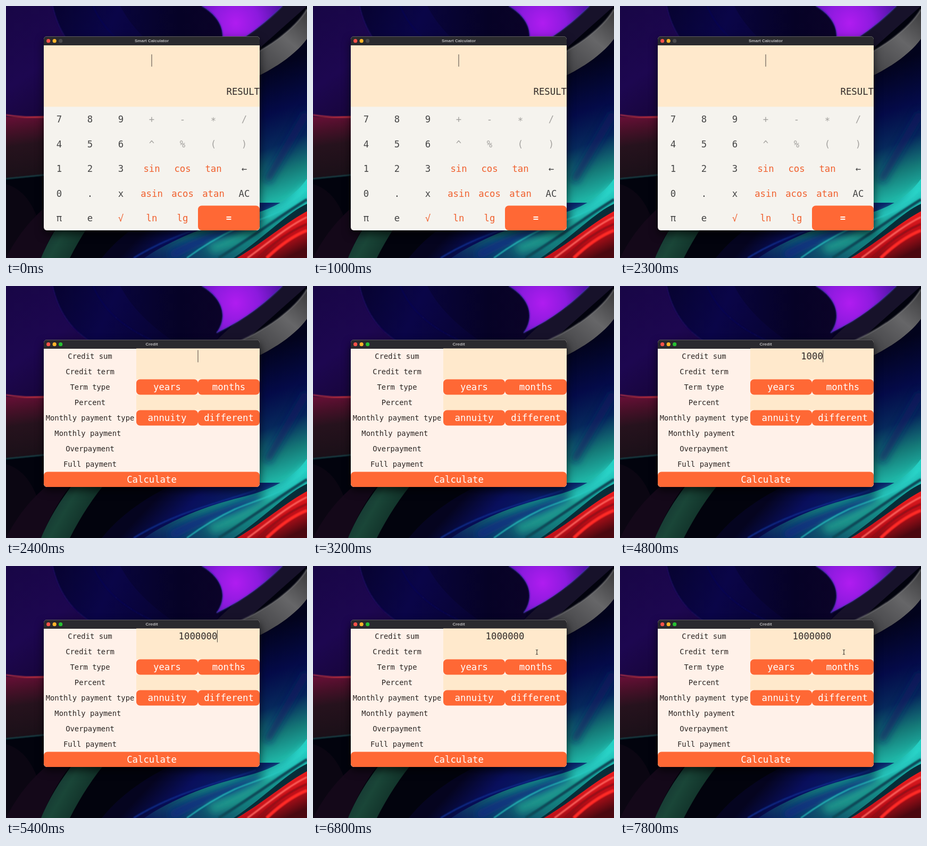
An HTML page for the animation above (8 s loop, 566 px wide and 474 px high).

```html
<!DOCTYPE html>
<html lang="en">
<head>
<meta charset="utf-8">
<title>Calculator</title>
<style>
html, body { margin: 0; width: 566px; height: 474px; overflow: hidden; background: #02030d }
svg { display: block }
text { font: 17.3px "DejaVu Sans Mono", monospace; text-anchor: middle }
.label { font-size: 13.85px; fill: #2b2523 }
.title { font: bold 8px "Liberation Sans", sans-serif; fill: #b9b9bb }
.num { fill: #444 }
.op { fill: #a3a19e }
.fn { fill: #f0612f }
.btn { fill: #fff }
</style>
</head>
<body>
<svg width="566" height="474" viewBox="0 0 566 474">
  <defs>
    <filter id="soft" x="-20%" y="-20%" width="140%" height="140%"><feGaussianBlur stdDeviation="1"/></filter>
    <filter id="haze" x="-50%" y="-50%" width="200%" height="200%"><feGaussianBlur stdDeviation="7"/></filter>
    <filter id="shadow" x="-20%" y="-20%" width="140%" height="140%">
      <feDropShadow dx="0" dy="7" stdDeviation="8" flood-color="#000" flood-opacity=".65"/>
    </filter>
    <linearGradient id="indigo" x2=".7" y2="1">
      <stop stop-color="#180646"/><stop offset=".5" stop-color="#1d0750"/><stop offset="1" stop-color="#140430"/>
    </linearGradient>
    <linearGradient id="blue" x2="1" y2=".3">
      <stop stop-color="#070330"/><stop offset=".35" stop-color="#0a0548"/><stop offset="1" stop-color="#060222"/>
    </linearGradient>
    <linearGradient id="disc" x2="1">
      <stop stop-color="#08043a"/><stop offset=".6" stop-color="#060226"/><stop offset="1" stop-color="#0b0328"/>
    </linearGradient>
    <radialGradient id="violet" gradientUnits="userSpaceOnUse" cx="432" cy="32" r="110">
      <stop stop-color="#b01cf0"/><stop offset=".4" stop-color="#8c1ade"/><stop offset="1" stop-color="#34108a"/>
    </radialGradient>
    <linearGradient id="steel" x1="1" x2="0" y2="1">
      <stop stop-color="#3a3a3c"/><stop offset=".35" stop-color="#666668"/><stop offset=".7" stop-color="#48484b"/><stop offset="1" stop-color="#1c1c20"/>
    </linearGradient>
    <linearGradient id="navy" gradientUnits="userSpaceOnUse" x1="478" y1="120" x2="560" y2="345">
      <stop stop-color="#02031c"/><stop offset=".35" stop-color="#040a48"/><stop offset=".6" stop-color="#06285c"/>
      <stop offset=".82" stop-color="#157a78"/><stop offset="1" stop-color="#1fb3a4"/>
    </linearGradient>
    <linearGradient id="deep" gradientUnits="userSpaceOnUse" x1="300" y1="380" x2="400" y2="474">
      <stop stop-color="#05041f"/><stop offset=".4" stop-color="#090f5c"/><stop offset="1" stop-color="#0a2468"/>
    </linearGradient>
    <linearGradient id="teal" x1="1" x2="0" y2="1">
      <stop stop-color="#25d3c6"/><stop offset=".35" stop-color="#17938f"/><stop offset=".65" stop-color="#147478"/><stop offset="1" stop-color="#0a1c5c"/>
    </linearGradient>
    <linearGradient id="red" x2=".7" y2="1">
      <stop stop-color="#8a0a14"/><stop offset=".4" stop-color="#f8201f"/><stop offset=".7" stop-color="#c0101a"/><stop offset="1" stop-color="#4a0810"/>
    </linearGradient>
    <linearGradient id="crimson" x2=".1" y2="1">
      <stop stop-color="#6a0f38"/><stop offset=".25" stop-color="#471028"/><stop offset=".5" stop-color="#26121d"/><stop offset="1" stop-color="#1a1018"/>
    </linearGradient>
    <linearGradient id="green" x2="1" y2=".5">
      <stop stop-color="#10202a"/><stop offset=".5" stop-color="#1a4638"/><stop offset="1" stop-color="#0b241f"/>
    </linearGradient>
    <clipPath id="calcClip"><rect x="71" y="57" width="406" height="365" rx="6"/></clipPath>
    <clipPath id="creditClip"><rect x="71" y="101" width="406" height="277" rx="6"/></clipPath>
  </defs>

  <!-- wallpaper -->
  <g>
    <path d="M88 0C98 45 120 80 160 105L210 212H420V0Z" fill="url(#blue)"/>
    <path d="M0 0H88C98 45 120 80 160 105L210 212L0 208Z" fill="url(#indigo)"/>
    <path d="M215 0C240 50 290 90 340 120H385C415 80 416 28 368 0Z" fill="url(#disc)"/>
    <path d="M566 0H505L385 112H440Z" fill="#17122a"/>
    <path d="M368 0C410 25 416 60 396 88C435 70 475 45 520 0Z" fill="url(#violet)"/>
    <path d="M566 6C545 42 490 84 420 112L470 134C520 110 550 84 566 62Z" fill="url(#steel)"/>
    <path d="M470 134C520 110 550 84 566 62V345L470 402Z" fill="url(#navy)"/>
    <path d="M180 474C215 430 260 400 320 370H566V474Z" fill="url(#deep)"/>
    <path d="M566 325C540 362 500 384 440 398C380 412 310 440 260 474H432C480 450 535 396 566 378Z" fill="url(#teal)"/>
    <path d="M566 372C530 388 480 440 428 474H445C490 440 530 405 566 390Z" fill="#082c38"/>
    <path d="M566 386C530 405 485 444 434 474H566Z" fill="url(#red)"/>
    <path d="M0 208C30 211 55 207 80 206V318L0 325Z" fill="url(#crimson)"/>
    <path d="M0 335C35 345 65 380 75 474H0Z" fill="#0b0612"/>
    <path d="M0 474C20 435 45 400 90 365H130C100 400 80 440 66 474Z" fill="#140819"/>
    <path d="M66 474C80 440 100 405 132 365H192C165 395 140 435 120 474Z" fill="url(#green)"/>
  </g>
  <g filter="url(#haze)" fill="none">
    <path d="M310 470C360 440 420 425 480 400" stroke="#0a2c80" stroke-width="16"/>
    <path d="M385 458C420 445 460 425 500 396" stroke="#25a898" stroke-width="18" opacity=".7"/>
    <path d="M566 340C540 372 520 382 490 395" stroke="#2fe4d8" stroke-width="12" opacity=".8"/>
    <path d="M490 330L566 200" stroke="#0a1c60" stroke-width="14" opacity=".7"/>
  </g>
  <g fill="none" filter="url(#soft)">
    <path d="M88 0C98 45 120 80 160 105" stroke="#241a80"/>
    <path d="M164 0C182 45 225 85 300 112" stroke="#10106a"/>
    <path d="M368 0C410 25 416 60 396 88" stroke="#2a2a8c" stroke-width="1.5"/>
    <path d="M520 0C475 45 435 70 396 88" stroke="#3a3aa0" stroke-width="1.5"/>
    <path d="M566 6C545 42 490 84 420 112" stroke="#77777a" stroke-width="1.5"/>
    <path d="M0 205C30 210 50 209 75 209" stroke="#d83a44" stroke-width="2"/>
    <path d="M0 325L80 317" stroke="#1d6468" stroke-width="1.5"/>
    <path d="M240 474C320 425 400 408 470 384" stroke="#0c2a88" stroke-width="3"/>
    <path d="M566 350C525 392 470 402 430 420C400 434 370 452 340 474" stroke="#28c8c0" stroke-width="2"/>
    <path d="M566 364C520 392 470 430 400 474" stroke="#0a4858" stroke-width="5"/>
    <path d="M566 397C530 414 490 448 454 474" stroke="#ff6a64" stroke-width="3"/>
    <path d="M566 422C535 434 510 455 490 474" stroke="#ff2a27" stroke-width="6"/>
    <path d="M566 410C530 425 500 448 474 474" stroke="#8c0a16" stroke-width="3"/>
  </g>

  <g id="calc"></g>
  <g id="credit"></g>
  <rect id="caret" width="1" fill="#4a4540"/>
  <path id="mouse" d="M-2-4.5Q0-4.5 0-3Q0-4.5 2-4.5M0-3V3M-2 4.5Q0 4.5 0 3Q0 4.5 2 4.5" fill="none" stroke="#302c28"/>
</svg>
<script>
const $ = id => document.getElementById(id);
const ORANGE = '#ff6835', CREAM = '#ffe9cc';
const rect = (x, y, w, h, fill, r = 0) =>
  `<rect x="${x}" y="${y}" width="${w}" height="${h}" rx="${r}" fill="${fill}"/>`;
const text = (x, y, s, cls, style = '') => `<text x="${x}" y="${y}" class="${cls}" style="${style}">${s}</text>`;

function frame(clip, y, height, title, zoom, bg, body) {
  const dots = ['#fb5148', '#fdb52b', zoom].map((c, i) =>
    `<circle cx="${79.7 + i * 11.5}" cy="${y + 8.7}" r="3.6" fill="${c}"/>`).join('');
  return `<g filter="url(#shadow)"><g clip-path="url(#${clip})">` +
    rect(71, y, 406, height, bg) + rect(71, y, 406, 17, '#2b2a2d') + rect(71, y, 406, 1, '#5b5a5e') +
    dots + text(274, y + 11.3, title, 'title') + body + '</g></g>';
}

function calcBody() {
  const rows = ['7 8 9 + - * /', '4 5 6 ^ % ( )', '1 2 3 sin cos tan ←', '0 . x asin acos atan AC', 'π e √ ln lg'];
  const kind = k => /^([a-z]{2,}|√)$/.test(k) ? 'fn' : /^[-+*\/^%()]$/.test(k) ? 'op' : 'num';
  let out = rect(71, 74, 406, 115.5, CREAM) + text(477, 166.5, 'RESULT', 'num', 'text-anchor:end;fill:#302c29');
  rows.forEach((row, r) => row.split(' ').forEach((k, c) => {
    out += text(100 + c * 58, 219.3 + r * 46.5 + (k === '*' ? 2.5 : 0), k, kind(k));
  }));
  return out + rect(361, 375.5, 116, 46.5, ORANGE, 7) + text(419, 405, '=', 'btn', 'font-weight:bold');
}

function creditBody() {
  // The no-break space keeps that label left of centre.
  const labels = ['Credit sum', 'Credit term', 'Term type', 'Percent', 'Monthly payment type',
    'Monthly payment\u00a0', 'Overpayment', 'Full payment'];
  const button = (x, row, w, s) =>
    rect(x, 117.5 + row * 29, w, 29, ORANGE, 7) + text(x + w / 2, 138.3 + row * 29, s, 'btn');
  return labels.map((s, i) => text(158, 137 + i * 29, s, 'label')).join('') +
    rect(245, 117.5, 232, 58, CREAM) + rect(245, 204.5, 232, 29, CREAM) +
    button(245, 2, 116, 'years') + button(361, 2, 116, 'months') +
    button(245, 4, 116, 'annuity') + button(361, 4, 116, 'different') +
    button(71, 8, 406, 'Calculate') + '<text id="sum" x="361" y="138.3" class="num" style="fill:#302c29"></text>';
}

$('calc').innerHTML = frame('calcClip', 57, 365, 'Smart Calculator', '#4c4b4e', '#f5f3ee', calcBody());
$('credit').innerHTML = frame('creditClip', 101, 277, 'Credit', '#28c131', '#fff1e9', creditBody());

const keys = [4000, 4300, 4400, 4800, 4900, 5000, 5100];
const OPEN = 2400, CLICK = 6300;
const show = (id, on) => $(id).setAttribute('visibility', on ? 'visible' : 'hidden');

function draw(t) {
  const credit = t >= OPEN, term = t >= CLICK;
  show('calc', !credit);
  show('credit', credit);

  const typed = keys.filter(k => t >= k).length;
  $('sum').textContent = '1000000'.slice(0, typed);

  // The blink restarts whenever a field gains focus or a key is pressed.
  const start = term ? CLICK : typed ? keys[typed - 1] : credit ? OPEN : -100;
  const caret = $('caret');
  caret.setAttribute('x', !credit ? 273.5 : term ? 360.5 : 360.5 + typed * 5.2);
  caret.setAttribute('y', !credit ? 91 : term ? 150 : 120.5);
  caret.setAttribute('height', 23);
  show('caret', (t - start) % 1000 < 500);

  const p = Math.min(1, Math.max(0, (t - 5600) / 500)), ease = p * p * (3 - 2 * p);
  show('mouse', t >= 5600);
  $('mouse').setAttribute('transform', `translate(${430 - 9 * ease} ${138 + 24 * ease})`);
}

function tick() {
  draw(performance.now() % 8000);
  requestAnimationFrame(tick);
}
tick();
</script>
</body>
</html>
```
